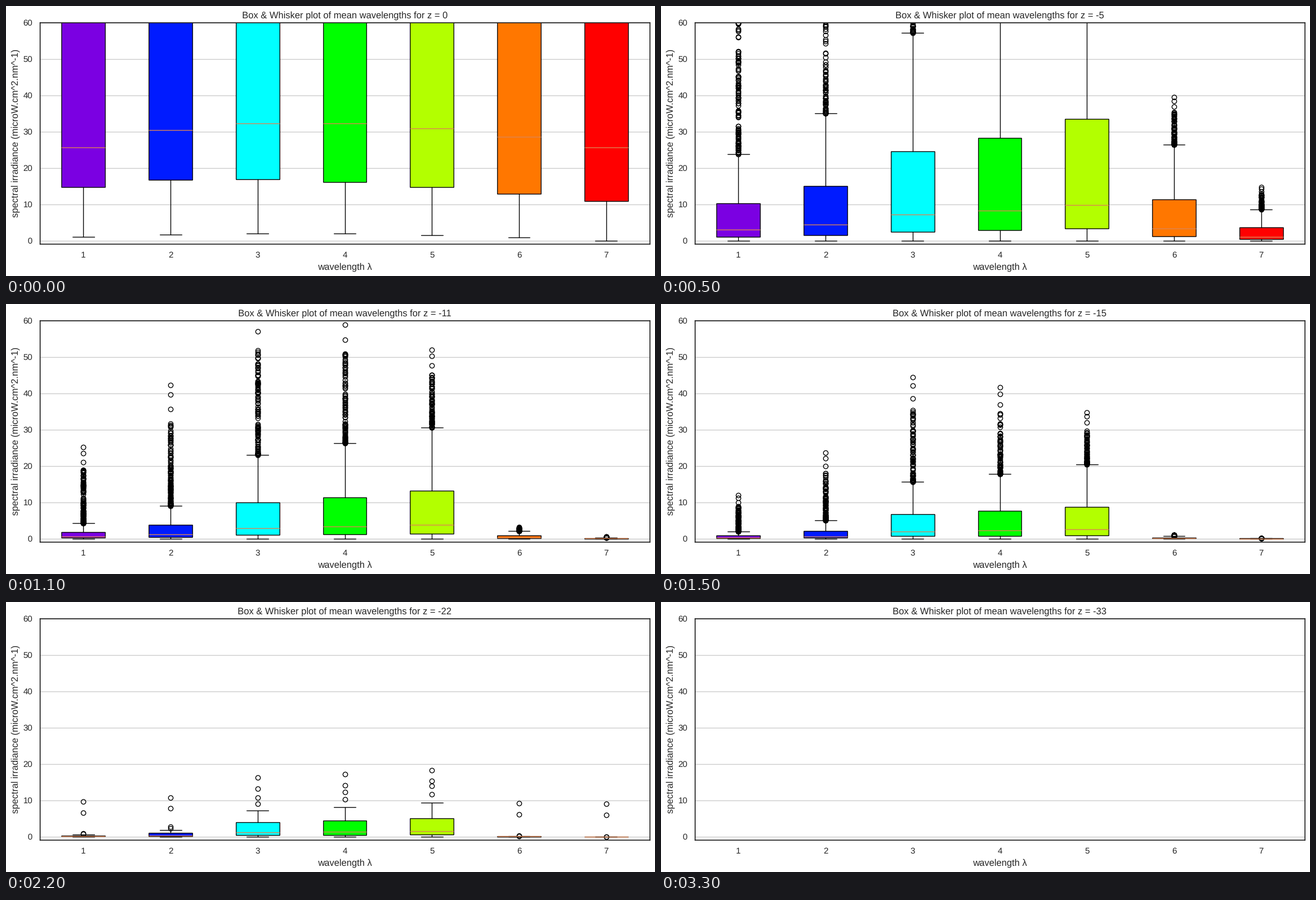
A matplotlib script that plays this animation: 1160x483 px, repeating every 3.4 s.

```python
import numpy as np
import matplotlib.pyplot as plt
from matplotlib.animation import FuncAnimation

W, H, DPI = 1160, 483, 100
FRAMES, INTERVAL = 34, 100
INK, GRID, MEDIAN = "0.15", "0.8", "#dd8452"
COLORS = ["#7b00e2", "#001bff", "#00ffff", "#00ff00", "#b3ff00", "#ff7700", "#ff0000"]
BAND = np.arange(len(COLORS))

SHALLOW = 5              # light settles into simple decay below this depth
SPARSE, LAST = 22, 24    # few profiles reach SPARSE, a single one reaches LAST

UPPER = np.array([10.2, 15, 24.5, 28.2, 33.5, 11.3, 3.7])    # upper quartile at SHALLOW
FADE = np.array([2.48, 1.94, 1.3, 1.31, 1.34, 3.62, 4.8])    # log loss over the next 10 m
TAIL = np.array([6, 4.7, 2.85, 2.35, 1.7, 1.5, 1.7])         # largest outlier / whisker

plt.rcParams.update({
    "font.family": "Liberation Sans", "font.size": 12, "text.hinting": "none",
    "text.color": INK, "axes.labelcolor": INK,
    "xtick.color": INK, "ytick.color": INK,
    "axes.edgecolor": INK, "axes.linewidth": 1.25, "axes.axisbelow": True,
    "lines.solid_capstyle": "round",
})


def quartiles(depth):
    """Lower quartile, median and upper quartile of every band."""
    loss = np.interp(depth, [SHALLOW, 11, 15, SPARSE, LAST], [0, 0.7, 1, 1.42, 1.53])
    deep = np.outer([0.1, 0.29, 1], UPPER * np.exp(-FADE * loss))
    median = 25.7 + 6.8 * np.sin(np.pi * (BAND / 6) ** 0.8)
    surface = np.array([median * (0.575 - 0.025 * BAND), median, median / 0.36])
    mix = min(depth / SHALLOW, 1)
    return surface ** (1 - mix) * deep ** mix


def outliers(depth, high):
    if depth > SPARSE:
        return [[]] * len(high)
    if depth == SPARSE:  # two stray bright profiles stand out in all bands
        return [[1.25 * h, 1.5 * h, h + 6, h + 9] for h in high]
    rng = np.random.default_rng(40 + depth)
    crowd = np.interp(depth, [SHALLOW, 15, SPARSE], [150, 95, 6]) * (1.2 - 0.12 * BAND)
    return [h * (1 + (t - 1) * np.append(0.7 * rng.random(int(n) + 1) ** 1.7, [0.8, 0.92, 1]))
            for h, t, n in zip(high, TAIL, crowd)]


def box_stats(depth):
    q1, med, q3 = quartiles(depth)
    reach = np.interp(depth, [15, SPARSE], [1.48, 0.95])
    high = q3 + reach * (q3 - q1)
    low = 1.95 * np.sin(np.pi * (BAND + 1.2) / 7.2) * max(0, 1 - depth / SHALLOW) ** 2
    # the sample shrinks to one profile, so every box closes on a single value
    spread = np.interp(depth, [SPARSE, LAST], [1, 0])
    low, med, q3, high = (q1 + spread * (v - q1) for v in (low, med, q3, high))
    keys = ("whislo", "q1", "med", "q3", "whishi", "fliers")
    return [dict(zip(keys, column))
            for column in zip(low, q1, med, q3, high, outliers(depth, high))]


fig = plt.figure(figsize=(W / DPI, H / DPI), dpi=DPI, facecolor="white")
ax = fig.add_axes([60.55 / W, 1 - 426.1 / H, 1090 / W, 396.5 / H])
ax.set(xlim=(0.5, 7.5), ylim=(-1, 60), xticks=BAND + 1, yticks=range(0, 61, 10))
ax.tick_params(length=0, pad=9.5, labelsize=11)
ax.grid(axis="y", color=GRID, linewidth=1)
ax.set_xlabel("wavelength λ")
ax.set_ylabel("spectral irradiance (microW.cm^2.nm^-1)")
title = ax.set_title("", fontsize=12)
drawn = []


def clear():
    while drawn:
        drawn.pop().remove()
    return []


def update(frame):
    clear()
    title.set_text(f"Box & Whisker plot of mean wavelengths for z = {-frame}")
    if frame > LAST:
        return []
    line = dict(color="black", linewidth=1)
    parts = ax.bxp(
        box_stats(frame), positions=BAND + 1, widths=0.5,
        patch_artist=True, manage_ticks=False,
        boxprops=dict(edgecolor="black", linewidth=1),
        whiskerprops=line, capprops=line,
        medianprops=dict(color=MEDIAN, linewidth=1),
        flierprops=dict(marker="o", markersize=6, markerfacecolor="none",
                        markeredgecolor="black", markeredgewidth=1, linestyle="none"))
    for box, color in zip(parts["boxes"], COLORS):
        box.set_facecolor(color)
    for group in parts.values():
        drawn.extend(group)
    return drawn


anim = FuncAnimation(fig, update, frames=FRAMES, init_func=clear,
                     interval=INTERVAL, repeat=True, blit=False)
plt.show()
```
